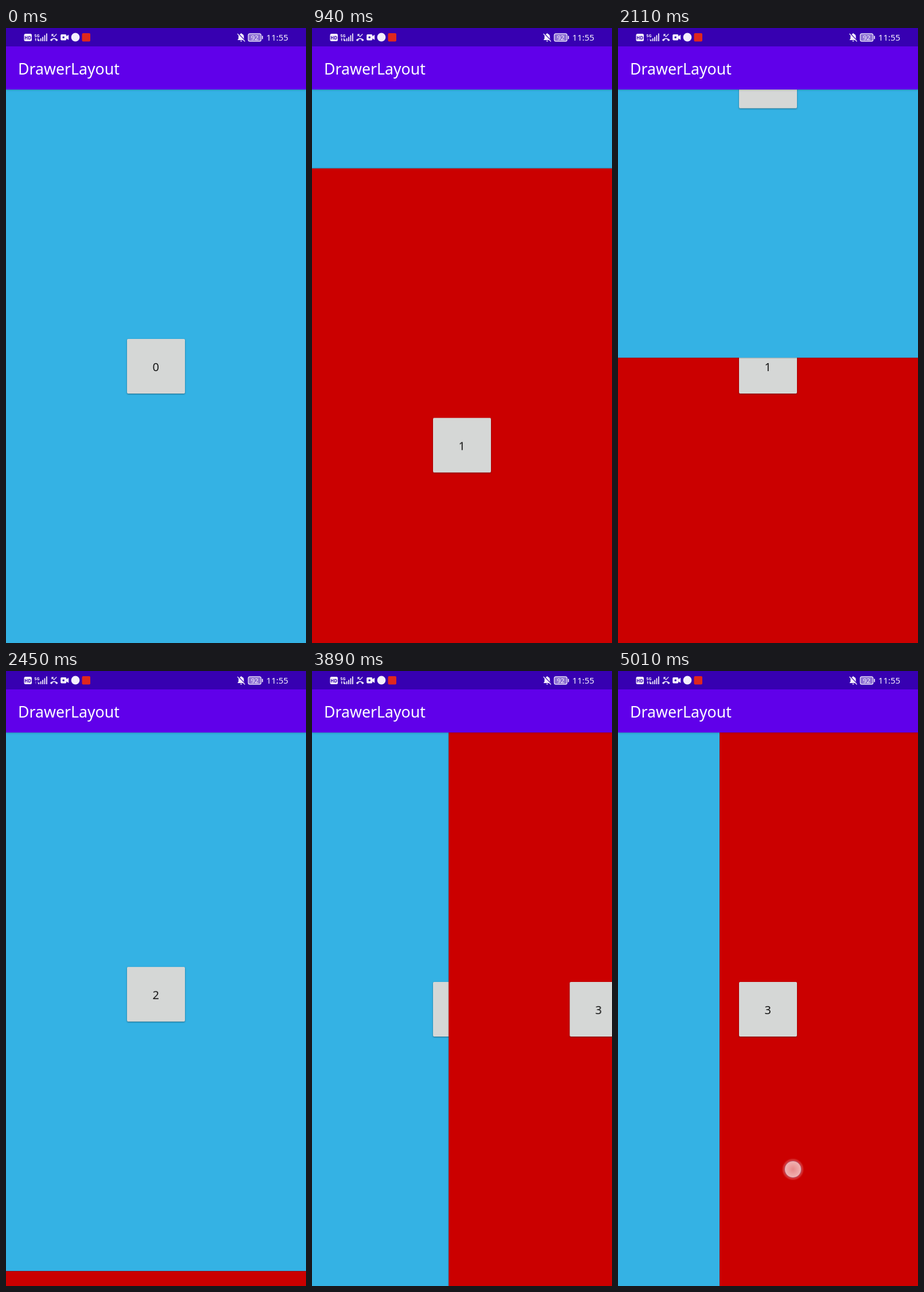
An HTML page for the animation above (5030 ms loop, 523 px wide and 1070 px high).

```html
<!DOCTYPE html>
<html lang="en">
<head>
<meta charset="utf-8">
<title>DrawerLayout</title>
<style>
  :root {
    --loop: 5030ms;
    --settle: cubic-bezier(.22, 1, .36, 1);
    --blue: #34b2e4;
    --red: #cb0000;
  }
  html, body {
    margin: 0; width: 100%; height: 100%; overflow: hidden;
    background: var(--blue);
    font-family: "Noto Sans", "Open Sans", sans-serif;
  }
  .bars { position: absolute; left: 0; top: 0; display: block; }
  .bar-shade {
    position: absolute; left: 0; top: 0; width: 523px; height: 107px;
    box-shadow: 0 1px 3px rgba(0, 0, 0, .22);
  }
  .content {
    position: absolute; left: 0; top: 107px; width: 523px; height: 963px;
    overflow: hidden; background: var(--blue);
  }
  .page {
    position: absolute; left: 0; top: 0; width: 523px; height: 963px;
    animation: var(--loop) linear infinite;
  }
  .blue { background: var(--blue); }
  .red { background: var(--red); }
  .drawer { box-shadow: 0 0 1.5px rgba(0, 0, 0, .75); }

  .button {
    position: absolute; left: 211px; top: 434px; width: 100.5px; height: 95px;
    border-radius: 2px; background: #d5d7d6; color: #141414;
    box-shadow: 0 1px 2.5px rgba(0, 0, 0, .42);
    font-size: 20px; font-weight: 500; line-height: 97px; text-align: center;
  }

  .dot {
    position: absolute; width: 28px; height: 28px; margin: -14px 0 0 -14px;
    border-radius: 50%; opacity: 0;
    background: radial-gradient(circle closest-side,
      rgba(255, 255, 255, .54), rgba(255, 255, 255, .7));
    box-shadow: 0 0 0 1px rgba(120, 140, 205, .42),
                0 0 2px 4px rgba(255, 255, 255, .2);
    animation: var(--loop) step-end infinite;
  }

  .up    { animation-name: slide-up; }
  .down  { animation-name: slide-down; }
  .left  { animation-name: slide-left; }
  .right { animation-name: slide-right; }
  .up .dot    { left: 50px;   top: -272px; animation-name: touch-up; }
  .down .dot  { left: 131px;  top: 1444px; animation-name: touch-down; }
  .left .dot  { left: -222px; top: 727px;  animation-name: touch-left; }
  .right .dot { left: 651px;  top: 760px;  animation-name: touch-right; }

  /* Each page follows the finger, then settles after release. */
  @keyframes slide-up {
    0%, 4.17% { transform: translateY(970px); }
    4.175% { transform: translateY(963px); animation-timing-function: cubic-bezier(.45, .1, .8, .8); }
    10.537% { transform: translateY(654px); }
    13.718% { transform: translateY(470px); animation-timing-function: var(--settle); }
    25.646%, 100% { transform: none; }
  }
  @keyframes slide-down {
    0%, 30.01% { transform: translateY(-970px); }
    30.02% { transform: translateY(-963px); animation-timing-function: cubic-bezier(.4, .15, .75, .8); }
    34.195% { transform: translateY(-819px); animation-timing-function: cubic-bezier(.3, .4, .7, .9); }
    39.761% { transform: translateY(-672px); animation-timing-function: var(--settle); }
    51.69%, 100% { transform: none; }
  }
  @keyframes slide-left {
    0%, 62.42% { transform: translateX(530px); }
    62.425% { transform: translateX(523px); animation-timing-function: cubic-bezier(.45, .1, .8, .8); }
    69.583% { transform: translateX(445px); }
    74.95% { transform: translateX(340px); animation-timing-function: var(--settle); }
    86.879%, 100% { transform: none; }
  }
  @keyframes slide-right {
    0%, 90.65% { transform: translateX(-530px); }
    90.656% { transform: translateX(-523px); animation-timing-function: cubic-bezier(.45, .1, .8, .8); }
    99.602%, 100% { transform: translateX(-346px); }
  }

  @keyframes touch-up    { 0% { opacity: 0; } 4.175% { opacity: 1; } 13.718%, 100% { opacity: 0; } }
  @keyframes touch-down  { 0% { opacity: 0; } 30.02% { opacity: 1; } 39.761%, 100% { opacity: 0; } }
  @keyframes touch-left  { 0% { opacity: 0; } 62.425% { opacity: 1; } 74.95%, 100% { opacity: 0; } }
  @keyframes touch-right { 0% { opacity: 0; } 90.656%, 100% { opacity: 1; } }

  .traffic { animation: traffic var(--loop) step-end infinite; }
  @keyframes traffic { 0% { opacity: .9; } 30.02% { opacity: .3; } 62.425%, 100% { opacity: .9; } }
</style>
</head>
<body>
<div class="content">
  <div class="page blue"><div class="button">0</div></div>
  <div class="page red drawer up"><div class="button">1</div><div class="dot"></div></div>
  <div class="page blue drawer down"><div class="button">2</div><div class="dot"></div></div>
  <div class="page red drawer left"><div class="button">3</div><div class="dot"></div></div>
  <div class="page blue drawer right"><div class="button">4</div><div class="dot"></div></div>
</div>
<div class="bar-shade"></div>

<svg class="bars" width="523" height="107" viewBox="0 0 523 107" fill="#f4f0fc">
  <rect width="523" height="32" fill="#3700b1"/>
  <rect y="32" width="523" height="75" fill="#6000ea"/>
  <text x="21" y="81" font-size="26.7" font-weight="500" fill="#fff">DrawerLayout</text>

  <!-- HD voice and signal -->
  <rect x="31.5" y="10" width="13.5" height="13" rx="2.5"/>
  <text x="38.2" y="19.6" font-size="8" font-weight="700" text-anchor="middle" fill="#3700b1">HD</text>
  <text x="49.5" y="15.6" font-size="7" font-weight="700">5G</text>
  <path class="traffic" d="M50 19.5l1.7-2 1.7 2h-1v3h-1.4v-3zM54 20.5h1v-3h1.4v3h1l-1.7 2z"/>
  <path d="M56.4 20h1.8v3h-1.8zM59.8 18h1.8v5h-1.8zM63.2 15.5h1.8v7.5h-1.8zM66.6 12.5h1.8v10.5h-1.8zM70 9.5h1.8v13.5h-1.8z"/>

  <!-- Missed call -->
  <path d="M77.3 20.2q6.4-5.2 12.8 0q.6.6 0 1.2l-1.2 1.1q-.5.4-1.1 0l-1.7-1.2v-1.7q-2.4-.8-4.8 0v1.7l-1.7 1.2q-.6.4-1.1 0l-1.2-1.1q-.6-.6 0-1.2z"/>
  <path d="M80 14.2v-3h3M80 11.2l3.7 3.9 4.6-4.6" fill="none" stroke="#f4f0fc" stroke-width="1.2"/>

  <!-- Video and app notices -->
  <path d="M97 11h6.500q1.800 0 1.800 1.800v1.500l3.900-2.500v9l-3.900-2.500v1.500q0 1.800-1.800 1.800h-6.500q-1.800 0-1.800-1.800v-7q0-1.800 1.800-1.800z"/>
  <circle cx="100.2" cy="16.3" r="1.7" fill="#3700b1"/>
  <circle cx="121" cy="16" r="7.4"/>
  <rect x="132.500" y="9" width="14.500" height="14.500" rx="2" fill="#e0271d"/>

  <!-- Muted bell -->
  <path d="M410 9.200q1.200 0 1.300 1.100q3.400 1 3.400 4.700v3.600l1.500 1.800v.6h-12.400v-.6l1.500-1.800v-3.600q0-3.700 3.400-4.700q.1-1.100 1.300-1.100zM408.300 21.900h3.400q-.3 1.500-1.700 1.500t-1.700-1.500z"/>
  <path d="M404.500 9.200l13 13.600" stroke="#3700b1" stroke-width="1.300"/>
  <path d="M403.500 10l13 13.500" stroke="#f4f0fc" stroke-width="1.300"/>

  <!-- Battery and clock -->
  <rect x="422.300" y="9.800" width="22.400" height="13.400" rx="3" fill="#8d70d3" stroke="#f4f0fc" stroke-width="1.200"/>
  <rect x="446.300" y="13.500" width="1.700" height="6" rx=".8"/>
  <text x="433.500" y="20.800" font-size="11.500" font-weight="500" text-anchor="middle">92</text>
  <text x="453.800" y="22.300" font-size="15">11:55</text>
</svg>
</body>
</html>
```
